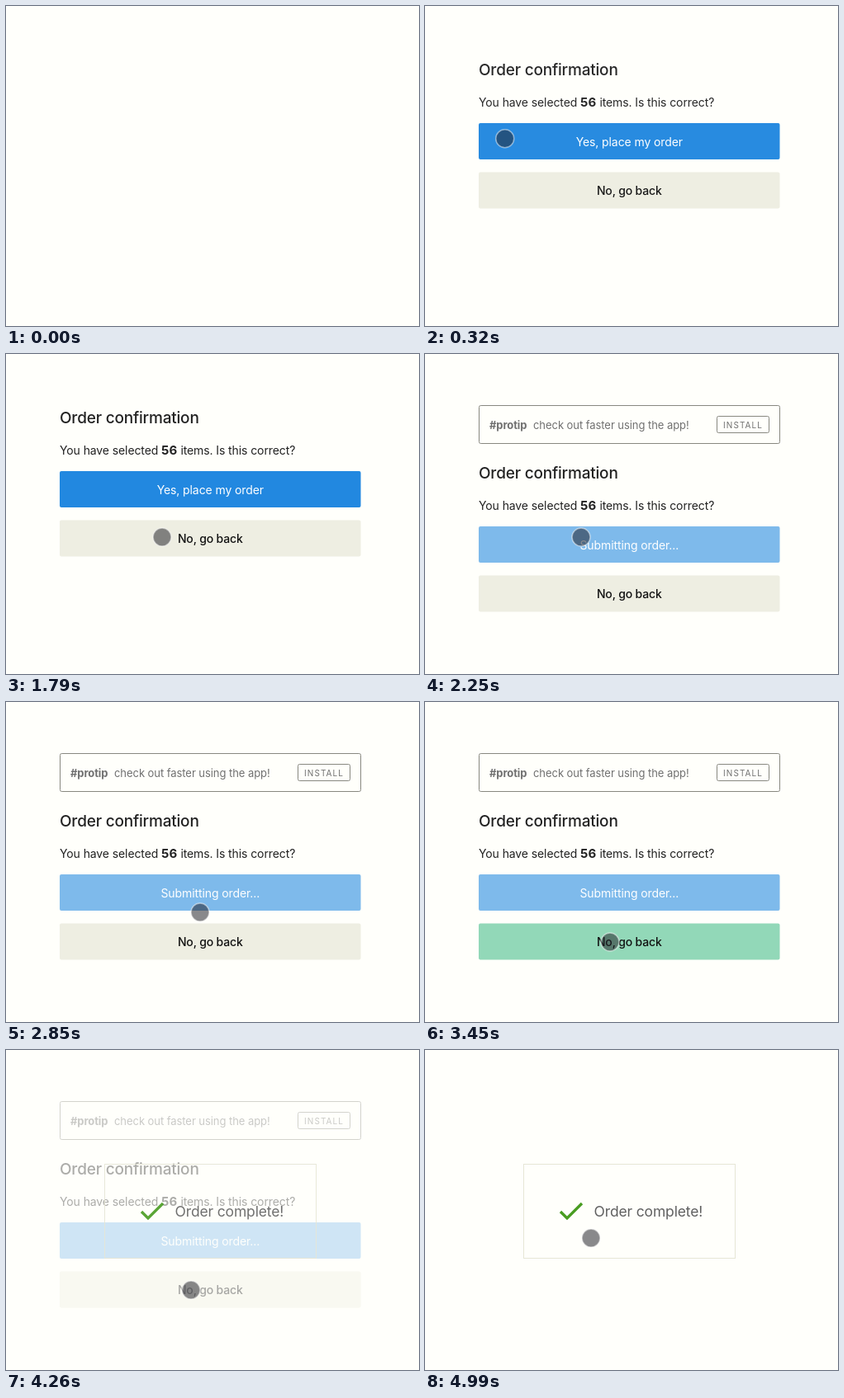
These frames come from a looping animation (500x388 px, 5.02 s). An HTML page:

```html
<!DOCTYPE html>
<html lang="en">
<head>
<meta charset="utf-8">
<title>Order confirmation</title>
<style>
  html, body { margin: 0; height: 100%; overflow: hidden; background: #fffffb; }
  svg { display: block; width: 500px; height: 388px; }
  text { font: 14px Inter, Roboto, sans-serif; letter-spacing: -.1px; fill: #222; }
  .title { font-size: 19px; font-weight: 500; letter-spacing: -.2px; }
  .count { font-size: 15px; font-weight: 700; letter-spacing: .2px; }
  .label { font-weight: 500; letter-spacing: -.15px; text-anchor: middle; fill: #111; }
  .tip { font-size: 13px; letter-spacing: -.06px; fill: #707070; }
  .tip.bold { font-weight: 700; letter-spacing: -.1px; }
  .install { font-size: 10px; letter-spacing: 1.1px; fill: #707070; }
  .frame { fill: none; stroke: #888880; }
  .done { font-size: 17.5px; letter-spacing: -.15px; fill: #606060; }
  #yesText { font-weight: 400; letter-spacing: -.1px; fill: #fff; }
</style>
</head>
<body>
<svg viewBox="0 0 500 388">
  <g id="page">
    <g id="banner">
      <rect class="frame" x="65.5" y="62.5" width="364" height="46" rx="2"/>
      <text class="tip bold" x="78" y="90.5">#protip</text>
      <text class="tip" x="131" y="90.5">check out faster using the app!</text>
      <rect class="frame" x="353.5" y="75.5" width="63" height="20" rx="2"/>
      <text class="install" x="361" y="89.5">INSTALL</text>
    </g>
    <g id="form">
      <text class="title" x="65" y="84">Order confirmation</text>
      <text x="65" y="122">You have selected <tspan class="count">56</tspan> items. Is this correct?</text>
      <rect id="yes" x="65" y="142" width="364.5" height="44" rx="2"/>
      <text id="yesText" class="label" x="247.3" y="169.5"></text>
      <rect id="no" x="65" y="201.5" width="364.5" height="44" rx="2"/>
      <text class="label" x="247.3" y="229">No, go back</text>
    </g>
  </g>
  <g id="card">
    <rect x="119.5" y="138.5" width="256" height="114" fill="none" stroke="#e6e6d6"/>
    <path d="M164 196L172 204L190 186" fill="none" stroke="#489c20" stroke-width="3.3"/>
    <text class="done" x="204.5" y="202">Order complete!</text>
  </g>
  <circle id="cursor" r="11" fill="#202028" fill-opacity=".53" stroke="#fff" stroke-opacity=".5" stroke-width="1.5"/>
</svg>
<script>
const LOOP = 5020;
const $ = id => document.getElementById(id);
const ramp = (t, a, b) => Math.min(1, Math.max(0, (t - a) / (b - a)));
const smooth = u => u * u * (3 - 2 * u);
const lerp = (a, b, u) => a + (b - a) * u;

// The pointer rests at each stop until the next move starts.
const moves = [
  { from: 30, to: 890, x: 234, y: 102 },
  { from: 890, to: 1600, x: 189, y: 222 },
  { from: 2350, to: 2850, x: 235, y: 255 },
  { from: 2850, to: 3050, x: 224, y: 291 },
  { from: 4360, to: 4880, x: 201, y: 228 }
];

function pointer(t) {
  let x = 47, y = 182;
  for (const m of moves) {
    const u = smooth(ramp(t, m.from, m.to));
    x = lerp(x, m.x, u);
    y = lerp(y, m.y, u);
  }
  return `translate(${x} ${y})`;
}

function draw(t) {
  const shifted = t >= 1920;
  const submitted = t >= 2060;
  const pressed = t >= 3340 && t < 3520;
  const enter = ramp(t, 30, 330);

  $("page").style.opacity = enter * (1 - ramp(t, 4080, 4370));
  $("banner").style.opacity = +shifted;
  $("form").setAttribute("transform", `translate(0 ${shifted ? 67 : 0})`);
  $("yes").style.fill = "#2288e0";
  $("yes").style.opacity = lerp(1, .58, ramp(t, 2060, 2240));
  $("yesText").textContent = submitted ? "Submitting order..." : "Yes, place my order";
  $("no").style.fill = pressed ? "#92d8b8" : "#eeeee2";
  $("card").style.opacity = ramp(t, 4080, 4280);
  $("cursor").setAttribute("transform", pointer(t));
  $("cursor").style.opacity = enter;
}

const start = performance.now();
function tick() {
  draw((performance.now() - start) % LOOP);
  requestAnimationFrame(tick);
}
tick();
</script>
</body>
</html>
```
